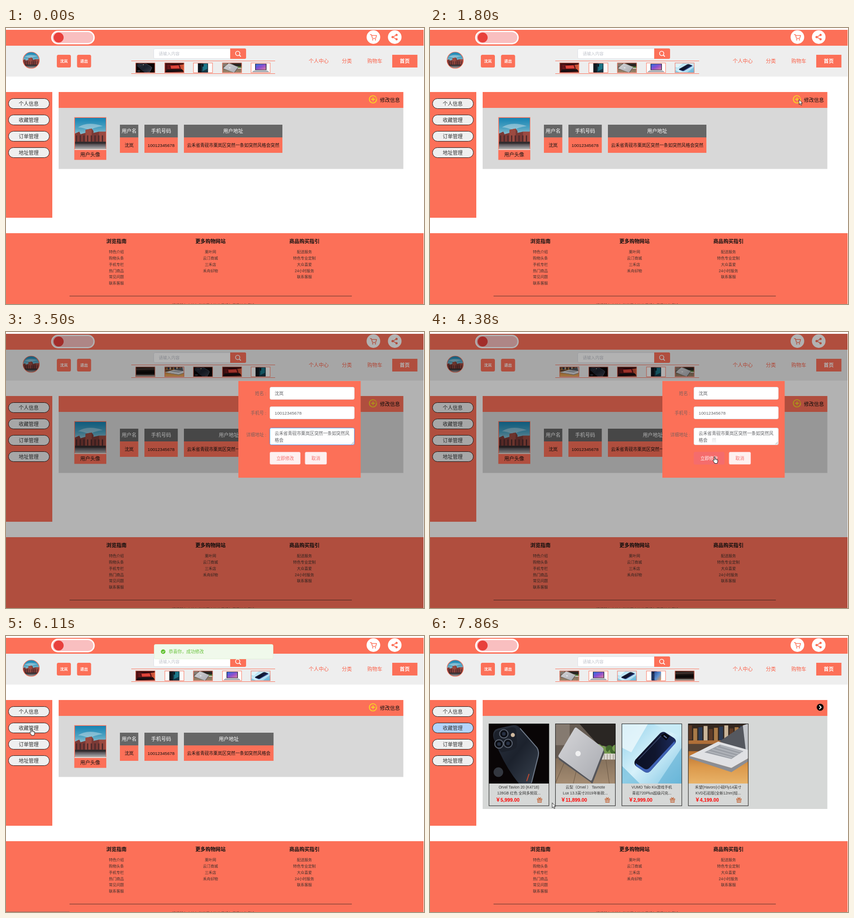
An HTML page that plays this animation: 921x608 px, repeating every 8 s.

```html
<!DOCTYPE html>
<html lang="zh-CN">
<head>
<meta charset="utf-8">
<title>个人中心</title>
<style>
html, body { margin: 0; width: 100%; height: 100%; overflow: hidden; background: #fff; }
svg { display: block; width: 921px; height: 608px; }
text { font-family: "Liberation Sans", "Noto Sans CJK SC", "Noto Sans CJK", sans-serif; white-space: pre; }
</style>
</head>
<body>
<svg id="stage" viewBox="0 0 921 608" xmlns="http://www.w3.org/2000/svg"></svg>
<script>
const CORAL = '#fc7058';
const USER = '沈岚', PHONE = '10012345678';
const ADDR = '云禾省青砚市栗岚区突然一条如突然风格会';

const rect = (x, y, w, h, fill, more = '') =>
  `<rect x="${x}" y="${y}" width="${w}" height="${h}" fill="${fill}" ${more}/>`;
const circle = (x, y, r, fill, more = '') =>
  `<circle cx="${x}" cy="${y}" r="${r}" fill="${fill}" ${more}/>`;
const path = (d, fill, more = '') => `<path d="${d}" fill="${fill}" ${more}/>`;
const line = (d, color, w = 1, more = '') => path(d, 'none', `stroke="${color}" stroke-width="${w}" ${more}`);
const group = (id, body, more = '') => `<g id="${id}" ${more}>${body}</g>`;
const use = (id, x, y, w, h) => `<use href="#${id}" x="${x}" y="${y}" width="${w}" height="${h}"/>`;
// y is the vertical middle of the glyphs
const text = (x, y, s, size, fill, anchor = 'middle', more = '') =>
  `<text x="${x}" y="${(y + size * 0.37).toFixed(2)}" font-size="${size}" fill="${fill}" text-anchor="${anchor}" ${more}>${s}</text>`;
const BOLD = 'font-weight="bold"', MEDIUM = 'font-weight="500"';
const times = (n, f) => Array.from({ length: n }, (_, i) => f(i)).join('');

const gradient = (id, stops, dir = 'x2="0" y2="1"') =>
  `<linearGradient id="${id}" ${dir}>${stops.map((c, i) =>
    `<stop offset="${i / (stops.length - 1)}" stop-color="${c}"/>`).join('')}</linearGradient>`;
const photo = (id, body) =>
  `<symbol id="${id}" viewBox="0 0 100 100" preserveAspectRatio="none">${body}</symbol>`;

const defs = `<defs>
${gradient('sky', ['#1583b3', '#4fa3c2', '#b9cfd6', '#d5d6d4'])}
${gradient('water', ['#4a4245', '#7c7b80', '#b8b3b0'])}
${gradient('slate', ['#2d3441', '#1c222d', '#39424f'], 'x2="1" y2="1"')}
${gradient('wood', ['#84705b', '#a48c72'])}
${gradient('silver', ['#d6d6d9', '#a9abb1'], 'x2="1" y2="1"')}
${gradient('ice', ['#8fd0ea', '#d6f1fa', '#7cc3e2'], 'x2="1" y2="1"')}
${gradient('navy', ['#0b1024', '#10162e', '#1c2b5e'], 'x2="1" y2="0"')}
${gradient('ember', ['#3a0d10', '#b0282a', '#d4613c'], 'x2="1" y2="0"')}
${gradient('neon', ['#2a6fe0', '#8a4fd0', '#e07ba0'], 'x2="1" y2="1"')}
${gradient('dusk', ['#2f4f9a', '#5b8fd0', '#e59a5a'], 'x2="1" y2="1"')}
${gradient('table', ['#b9702f', '#dc9a4c', '#e8b268'])}
${photo('city',
  rect(0, 0, 100, 100, 'url(#sky)') +
  path('M10 30Q40 10 90 26Q60 30 48 40Q26 30 10 30z', '#d5e5ea', 'opacity=".45"') +
  path('M0 50L14 44L18 52L34 48V38L54 34L60 42V48L78 44L82 52L100 44V84H0z', '#7b3a36') +
  path('M34 38L54 34V82H34zM78 44L100 44V82H78z', '#9b4a41') +
  times(8, i => rect(3 + i * 12, 56, 4, 20, '#4a2a2c')) +
  rect(0, 76, 100, 7, '#2f2b2e') + rect(0, 82, 100, 18, 'url(#water)'))}
${photo('p0',
  rect(0, 0, 100, 100, '#090506') +
  path('M8 24Q5 11 16 8L38 3Q46 1 52 7L81 40Q85 46 83 55L71 100H50Q24 68 8 24z', 'url(#slate)') +
  path('M9 24Q7 13 16 11L38 6Q45 5 46 12L47 36Q46 42 39 44L22 48Q14 44 9 24z', '#1b202a') +
  [[25, 17], [17, 34], [32, 33]].map(([x, y]) =>
    circle(x, y, 7, '#0c0e14', 'stroke="#59616f" stroke-width="1.6"') + circle(x, y, 3, '#273043')).join('') +
  circle(40, 19, 3.4, '#cfb99f') +
  line('M52 8L80 40Q84 46 82 55L71 99', '#6e7887', 1.6) + line('M67 84L63 96', '#c04a32', 1.6) +
  circle(16, 81, 8, '#33373f'))}
${photo('p1',
  rect(0, 0, 100, 100, 'url(#ember)') + path('M0 0H100V16L50 24L0 10z', '#2a0a0d') +
  path('M22 24L76 18L84 62L26 64z', '#5a1216') + path('M30 30L72 25L77 56L33 58z', '#e0453a') +
  path('M12 66L88 62L100 88L4 92z', '#1a1013') + rect(0, 92, 100, 8, '#4c1a18'))}
${photo('p2',
  rect(0, 0, 100, 100, '#fbfbfb') + rect(24, 4, 26, 92, '#12181f', 'rx="4"') +
  rect(42, 6, 34, 90, '#173846', 'rx="4"') + path('M50 12L72 8V60L48 82z', '#1d7688') +
  rect(46, 12, 7, 26, '#0b1118', 'rx="2"'))}
${photo('p3',
  rect(0, 0, 100, 60, '#665c53') + path('M40 0H100V40L72 36z', '#2a2623') + rect(0, 0, 24, 36, '#857a70') +
  rect(0, 58, 100, 42, 'url(#wood)') +
  times(4, i => line(`M${i * 30} 100L${18 + i * 22} 58`, '#6d5a47', 0.8)) +
  times(9, i => circle(72 + i * 3.6, 40 + (i * 7) % 11, 6, i % 2 ? '#41672c' : '#75994f')) +
  rect(74, 50, 26, 10, '#dcd8d0') + times(5, i => rect(76 + i * 5, 51, 1, 9, '#978f82')) +
  path('M6 56L60 96L80 44L82 48L62 100L6 60z', '#55565b') +
  path('M32 8Q34 5 37 8L79 40Q81 42 80 45L61 94Q60 96 57 94L7 57Q4 55 6 52z', 'url(#silver)') +
  circle(38, 50, 4.5, '#f0f0f1'))}
${photo('p4',
  rect(0, 0, 100, 100, '#fff') + rect(22, 10, 58, 62, '#1d2030') + rect(25, 14, 52, 54, 'url(#neon)') +
  path('M16 74H84L92 88H8z', '#b8bcc4') + rect(8, 87, 84, 4, '#6f747c'))}
${photo('p5',
  rect(0, 0, 100, 100, 'url(#ice)') + path('M0 0H44L16 48L0 40z', '#eef9fd', 'opacity=".8"') +
  path('M60 100L100 40V100z', '#58acd2', 'opacity=".55"') + path('M0 70L30 100H0z', '#5fb4d8', 'opacity=".6"') +
  path('M52 0L100 0V22L76 12z', '#c8ebf6') +
  path('M23 60Q19 66 24 71L37 80Q43 84 48 79L89 33Q92 28 87 24L73 15Q68 12 63 17z', 'url(#navy)') +
  path('M24 71L37 80Q43 84 48 79L89 33L88 29L46 74Q42 78 37 75L23 66z', '#3f62b4') +
  line('M28 60L66 20', '#3c486c', 1.2) +
  path('M65 20L72 16L80 21L74 28z', '#07090f') + line('M70 20L75 24', '#5b6c98', 2))}
${photo('p6',
  rect(0, 0, 100, 100, '#fff') + rect(26, 5, 28, 90, '#23355f', 'rx="4"') +
  rect(42, 8, 34, 86, 'url(#dusk)', 'rx="4"') + circle(36, 20, 5, '#0c1428'))}
${photo('p7',
  rect(0, 0, 100, 100, '#17110f') + path('M0 14L100 8V30L0 34z', '#3a2e2a') +
  path('M4 50L96 44L100 62L0 68z', '#0b0909') + rect(0, 80, 100, 20, '#8f8780') + rect(0, 76, 100, 6, '#4a423d'))}
${photo('p8',
  rect(0, 0, 100, 100, '#33271f') +
  times(12, i => rect(i * 8.6, 3 + (i * 5) % 7, 6.5, 24, ['#5d3a26', '#a87a48', '#2c3b55', '#c9b59a'][i % 4])) +
  rect(0, 28, 100, 6, '#b06f38') + rect(0, 34, 100, 14, '#574436') +
  rect(0, 46, 100, 54, 'url(#table)') +
  path('M52 30L90 4Q95 1 96 5L99 44L94 46z', '#55585f') + path('M91 3L100 0V48L96 46z', '#c4c7cc') +
  path('M2 54L50 30L100 44V58L72 74z', '#e0e1e4') + path('M27 48L53 35L92 46L72 59z', '#9da1a8') +
  times(4, i => line(`M${33 + i * 7} ${46 - i * 3}L${73 + i * 6} ${57 - i * 3}`, '#c8cbd0', 0.8)) +
  path('M2 54L72 74L100 58V63L72 81L2 58z', '#8b8e95'))}
<clipPath id="round"><circle cx="55.5" cy="71" r="18"/></clipPath>
</defs>`;

function header() {
  const cart = line('M802 14.500H805L807.500 23H814.500L816.500 16.500H806', CORAL, 1.5, 'stroke-linejoin="round"') +
    circle(808, 26, 1.3, CORAL) + circle(814, 26, 1.3, CORAL);
  const share = line('M860.500 15.500L852 20L860.500 24.500', CORAL, 1.7) +
    [[860.5, 15.3], [851.8, 20], [860.5, 24.7]].map(([x, y]) => circle(x, y, 2.5, CORAL)).join('');
  const button = (x, s) => rect(x, 59, 31, 28, CORAL, 'rx="3.5"') + text(x + 15.5, 73, s, 8.5, '#fff', 'middle', BOLD);
  const link = (x, s) => text(x, 73, s, 11, '#fb6149', 'middle', MEDIUM);
  return rect(0, 4, 920, 35, CORAL) + rect(0, 39, 920, 68, '#eee') +
    rect(101, 7.5, 93, 27, '#f9bfc0', 'rx="13.500" stroke="#fff" stroke-width="3"') + circle(116, 21, 11, '#e8403c') +
    circle(809.5, 20, 15, '#fff') + cart + circle(856.5, 20, 15, '#fff') + share +
    group('avatar', use('city', 37, 52.5, 37, 37), 'clip-path="url(#round)"') +
    circle(55.5, 71, 18, 'none', `stroke="${CORAL}" stroke-width="1.2"`) +
    button(112, USER) + button(156.5, '退出') +
    rect(325.5, 45.5, 170, 22, '#fff', 'rx="3" stroke="#dcdfe6"') +
    text(336.5, 56.5, '请输入内容', 9.2, '#c0c4cc', 'start') +
    path('M494 45H526Q529 45 529 48V65Q529 68 526 68H494z', CORAL) +
    circle(510.5, 56, 4.7, 'none', 'stroke="#fff" stroke-width="1.6"') + line('M514 59.500L517.500 63', '#fff', 1.8) +
    line('M276 72.500H593M276 100.500H593', CORAL) + group('thumbs', '') +
    link(689, '个人中心') + link(751, '分类') + link(812.5, '购物车') +
    rect(851, 59, 55.5, 28, CORAL) + text(878.5, 73, '首页', 11, '#fff', 'middle', BOLD);
}

function sidebar() {
  return rect(0, 141, 102, 277, CORAL) +
    ['个人信息', '收藏管理', '订单管理', '地址管理'].map((s, i) =>
      rect(5.5, 155.5 + i * 36, 90, 22, '#efefef', `id="tab${i}" rx="11" stroke="#1a1212"`) +
      text(50, 166.5 + i * 36, s, 11, '#333')).join('');
}

function profile() {
  const column = (x, w, head, cell, id) =>
    rect(x, 213, w, 28, '#666', `id="${id}Head"`) + rect(x, 241, w, 34, CORAL, `id="${id}Cell"`) +
    text(x + w / 2, 227, head, 11, '#fff', 'middle', `id="${id}Title"`) +
    text(x + w / 2, 258, cell, 9.7, '#111', 'middle', `id="${id}Text"`);
  return rect(116, 176, 759.5, 134.5, '#d8d8d8') +
    line('M814.500 151.800A8 8 0 1 0 816.500 157', '#f8d324', 1.9) + line('M804.500 157H813M808.700 152.800V161.200', '#f8d324', 1.9) +
    line('M814.500 151.800A8 8 0 0 1 816.500 157', '#f3b52c', 1.9) +
    text(846, 158.5, '修改信息', 11, '#111') +
    rect(150.5, 196.5, 70.5, 94, CORAL) + use('city', 152, 198, 68, 69) + rect(151, 267, 70, 1.5, '#eee') +
    text(185.5, 278.5, '用户头像', 11, '#111') +
    column(251, 40.5, '用户名', USER, 'user') + column(305, 73.5, '手机号码', PHONE, 'tel') +
    column(392, 217, '用户地址', '', 'addr');
}

function favourites() {
  const goods = [
    ['p0', 'Orvel Tavion 20 (K4718)', '128GB 红色 全网多频双...', '5,999.00', 0],
    ['p3', '云梨（Orvel ） Tavnote', 'Lux 13.3英寸2019年新款...', '11,899.00', 3],
    ['p5', 'VUMO Talo Kix游戏手机', '青岩720Plus超级闪充...', '2,999.00', 0],
    ['p8', '禾望(Havoro)小砚Fly14英寸', 'KVD石岩版(全新12nm)轻...', '4,199.00', 0]
  ];
  const gift = (x, y) => line(`M${x - 5} ${y - 2.5}h10v2.500h-10zM${x - 4} ${y}v5.500h8v-5.500M${x - 1.5} ${y - 2.5}v8M${x + 1.5} ${y - 2.5}v8M${x} ${y - 3}l-3 -2.500M${x} ${y - 3}l3 -2.500`, '#c05a2a', 1.1);
  return rect(116, 176, 759.5, 205, '#d6d8d7') + circle(859.7, 157, 7.7, '#0d0706') +
    line('M857.800 153L861.800 157L857.800 161', '#fff', 2) +
    goods.map(([pic, a, b, price, shift], i) => {
      const x = 129.5 + i * 146.4, mid = x + 66.3;
      return use(pic, x, 193, 132.5, 132) + rect(x + .5, 193.5, 132, 180.5, 'none', 'stroke="#111"') +
        text(mid, 333, a, 8.3, '#333') + text(mid, 345.5, b, 8.3, '#333') +
        text(x + 15 - shift, 361, '￥' + price, 10.8, '#f00', 'start', BOLD) + gift(x + 112 + shift, 361);
    }).join('');
}

function footer() {
  const columns = [
    [243.3, '浏览指南', '特色介绍 购物头条 手机专栏 热门商品 常见问题 联系客服'],
    [450.5, '更多购物网站', '栗叶网 云汀商城 三禾店 禾舟好物'],
    [657.5, '商品购买指引', '配送服务 特色专业定制 大众喜爱 24小时服务 联系客服']
  ];
  return rect(0, 452, 920, 156, CORAL) +
    columns.map(([x, head, items]) => text(x, 469.5, head, 11.1, '#111', 'middle', BOLD) +
      items.split(' ').map((s, i) => text(x, 493 + i * 13.85, s, 8.3, '#40302c')).join('')).join('') +
    line('M140 590.500H762', '#54332c') +
    text(457, 610.5, '版权所有本站仅供学习交流使用请勿用于其他用途', 8.3, '#40302c');
}

function dialog() {
  const field = (y, h, label, labelY, id) => text(573.5, labelY, label + ' :', 9.7, '#7d5f5b', 'end') +
    rect(581.5, y + .5, 186, h - 1, '#fff', `id="${id}" rx="3" stroke="#dcdfe6"`);
  const button = (x, w, s, id) => rect(x + .5, 264.5, w - 1, 27, '#fef0f0', `id="${id}" rx="2.500" stroke="#fbc4c4"`) +
    text(x + w / 2, 278.5, s, 9.7, '#f56c6c', 'middle', `id="${id}Text"`);
  const value = (y, s, more = '') => text(592, y, s, 9.7, '#606266', 'start', more);
  return rect(0, 4, 920, 604, '#000', 'opacity=".3"') + rect(512, 108, 269.5, 213, CORAL) +
    field(121, 28, '姓名', 135.5, 'nameBox') + value(135.5, USER) +
    field(164, 28, '手机号', 178.5, 'telBox') + value(178.5, PHONE) +
    field(211, 38, '详细地址', 226, 'area') + value(223.5, ADDR.slice(0, 17)) + value(238, '', 'id="tail"') +
    text(621, 238, '然', 9.7, '#d3d4d6', 'start', 'id="trace"') +
    line('M761 247.500L766.500 242M764 247.500L766.500 245', '#777', .8) +
    button(581, 68, '立即修改', 'save') + button(658.5, 48.5, '取消', 'cancel');
}

const toast = rect(326.5, 18.5, 262, 32, '#f0f9eb', 'rx="3" stroke="#e1f3d8"') + circle(346.3, 34.5, 5, '#5fc12f') +
  line('M344 34.500L345.800 36.300L348.800 33', '#fff', 1.1) + text(358.5, 34.5, '恭喜你，成功修改', 9.7, '#67c23a', 'start');

const cursors = {
  arrow: path('M.7 .5V11.500L3.200 9.200L4.900 13.200L6.800 12.400L5.100 8.500H8.300z', '#fff', 'stroke="#111" stroke-width=".9"'),
  hand: path('M3.600 8.800V2Q3.600 .7 4.700 .7T5.800 2V5.600Q7.500 5 8 6.200Q9.400 5.700 9.900 6.900Q11.500 6.600 11.500 8.300V11Q11.500 13 10.200 15.500H4.700Q4.200 13.500 1.200 9.800Q.4 8.500 1.500 7.900Q2.500 7.500 3.600 8.800z',
    '#fff', 'stroke="#111" stroke-width="1"') + line('M5.800 5.600V8M8 6.200V8.500M9.900 7V8.800', '#111', .7),
  beam: line('M-2.500 -5.500Q0 -5.500 0 -4V4Q0 5.500 -2.500 5.500M2.500 -5.500Q0 -5.500 0 -4V4Q0 5.500 2.500 5.500', '#222', 1.1)
};

const stage = document.getElementById('stage');
stage.innerHTML = defs + rect(0, 0, 921, 608, '#fff') + header() + sidebar() +
  rect(116, 141, 759.5, 35, CORAL) + group('profile', profile()) + group('favourites', favourites()) + footer() +
  group('dialog', dialog()) + group('toast', toast) + rect(0, 607, 140, 1, '#9a6a60', 'id="status"') + group('cursor', '');

const $ = id => document.getElementById(id);
const set = (id, attrs) => Object.entries(attrs).forEach(([k, v]) => $(id).setAttribute(k, v));
const show = (id, on) => set(id, { display: on ? 'inline' : 'none' });

const LOOP = 8000, COUNT = 9;
// first: index of the leftmost thumbnail; cursor: [kind, x, y]
const scenes = [
  { at: 0, first: 0 },
  { at: 860, first: 1, cursor: ['hand', 812, 157] },
  { at: 1800, first: 1, cursor: ['arrow', 812.5, 157] },
  { at: 2650, first: 2, open: true, cursor: ['beam', 661, 237] },
  { at: 3500, first: 7, open: true, edited: true, focus: true },
  { at: 4380, first: 8, open: true, edited: true, press: true, cursor: ['hand', 622.5, 274] },
  { at: 5230, first: 0, edited: true, toast: true },
  { at: 6110, first: 1, edited: true, toast: true, status: true, cursor: ['hand', 51.5, 203.5] },
  { at: 6990, first: 2, edited: true, toast: true, status: true, list: true, cursor: ['hand', 51.5, 203.5] },
  { at: 7860, first: 3, edited: true, list: true, cursor: ['arrow', 268.5, 367] }
];

function draw(s) {
  $('thumbs').innerHTML = times(5, i => {
    const x = 285.5 + Math.round(i * 63.5);
    return use('p' + (s.first + i) % COUNT, x, 76.5, 43, 22.5) + rect(x + .5, 77, 42, 21.5, 'none', `stroke="${CORAL}"`);
  });
  const w = s.edited ? 197.5 : 217;
  ['addrHead', 'addrCell'].forEach(id => set(id, { width: w }));
  ['addrTitle', 'addrText'].forEach(id => set(id, { x: 392 + w / 2 }));
  $('addrText').textContent = ADDR + (s.edited ? '' : '突然');
  $('tail').textContent = ADDR.slice(17) + (s.edited ? '' : '突然');
  show('trace', s.press);
  set('area', { stroke: s.focus ? '#409eff' : '#dcdfe6' });
  set('save', { fill: s.press ? '#f56c6c' : '#fef0f0', stroke: s.press ? '#f56c6c' : '#fbc4c4' });
  set('saveText', { fill: s.press ? '#fff' : '#f56c6c' });
  set('tab1', { fill: s.list ? '#b3d4fc' : '#efefef' });
  show('profile', !s.list);
  show('favourites', s.list);
  show('dialog', s.open);
  show('toast', s.toast);
  show('status', s.status);
  show('cursor', s.cursor);
  if (s.cursor) {
    const [kind, x, y] = s.cursor;
    $('cursor').innerHTML = cursors[kind];
    set('cursor', { transform: `translate(${x} ${y})` });
  }
}

let start = null, current = null;
function tick(now) {
  if (start === null) start = now;
  const t = (now - start) % LOOP;
  const scene = scenes.filter(s => s.at <= t).pop();
  if (scene !== current) draw(current = scene);
  requestAnimationFrame(tick);
}
draw(current = scenes[0]);
requestAnimationFrame(tick);
</script>
</body>
</html>
```
